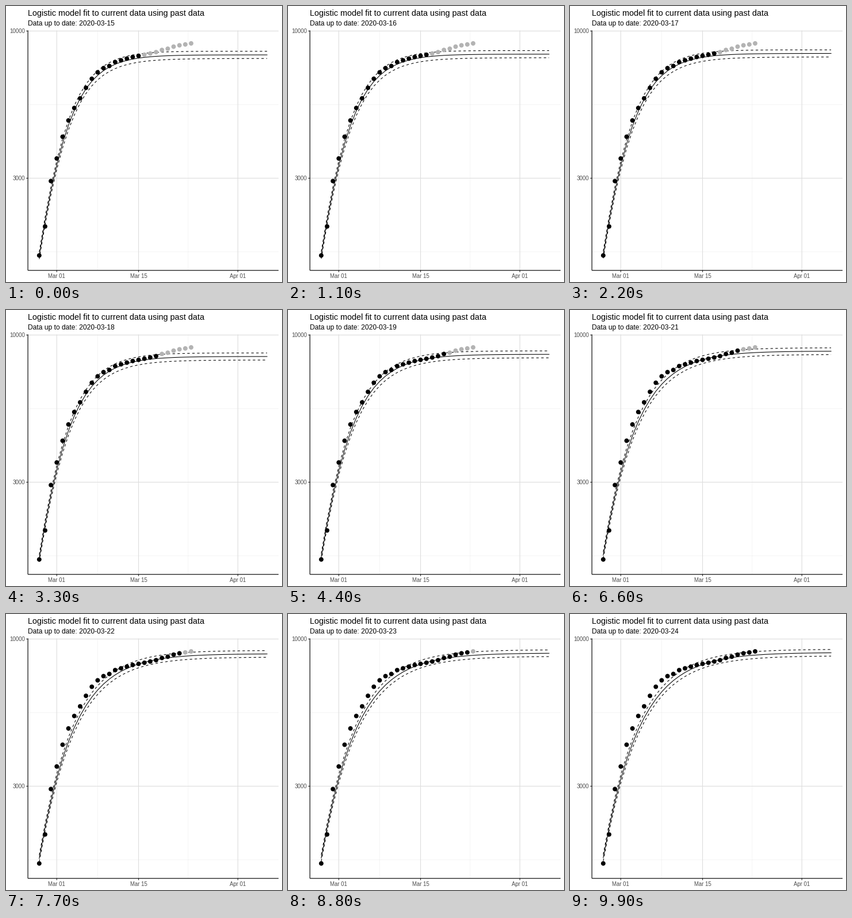
A matplotlib script for the animation above (10000 ms loop, 480 by 480 pixels).

```python
import matplotlib.pyplot as plt
import numpy as np
from matplotlib.animation import FuncAnimation

SIZE, DPI = 480, 72
LEFT, RIGHT, TOP, BOTTOM = 38.1, 474, 42.5, 459.8
DAY = 10.16           # pixels per day
DECADE = 489.6        # pixels per factor of ten
STEP_FRAMES = 11      # 1100 ms per date

plt.rcParams["font.family"] = "Liberation Sans"

cases = np.array([
    1595, 2022, 2931, 3526, 4212, 4812, 5328, 5766, 6284,
    6767, 7134, 7382, 7513, 7755, 7869, 7979, 8086, 8162,
    8236, 8320, 8413, 8565, 8652, 8799, 8897, 8961, 9037])
days = np.arange(40)
# How far the fit has drifted from the first date's to the last one's
drift = [0, .07, .14, .23, .44, .61, .75, .88, .95, 1]


def day_x(day):
    return 57.8 + DAY * np.asarray(day)


def count_y(n):
    return 43.5 + DECADE * (4 - np.log10(n))


def growth(d):
    """Generalised logistic curve in pixels, with the half width of its band."""
    plateau, start = 85 - 18 * d, 434 - 10 * d
    shape, rate = .5 - .4 * d, .268 - .096 * d
    q = 10 ** (shape * (start - plateau) / DECADE) - 1
    mid = plateau + DECADE / shape * np.log10(1 + q * np.exp(-rate * days))
    u = days / 6
    band = 6.2 - .5 * d + 2 * u * np.exp(1 - u)
    return mid, band


fig = plt.figure(figsize=(SIZE / DPI, SIZE / DPI), dpi=DPI, facecolor="white")
ax = fig.add_axes([0, 0, 1, 1])
ax.set(xlim=(0, SIZE), ylim=(SIZE, 0))
ax.axis("off")


def segment(x, y, color, lw, z=1):
    ax.plot(x, y, color=color, lw=lw, zorder=z, snap=False,
            solid_capstyle="butt")


def label(x, y, text, size, color="black", ha="left"):
    return ax.text(x, y, text, size=size, color=color, ha=ha, va="baseline")


# Grid
for x in (day_x(10), day_x(25.5)):
    segment([x, x], [TOP, BOTTOM], "#EBEBEB", .53)
for y in (171.5, 427.5):
    segment([LEFT, RIGHT], [y, y], "#EBEBEB", .53)
for day, name in ((3, "Mar 01"), (17, "Mar 15"), (34, "Apr 01")):
    x = day_x(day)
    segment([x, x], [TOP, BOTTOM], "#DEDEDE", 1.16)
    segment([x, x], [BOTTOM, BOTTOM + 3], "#333333", 1.16)
    label(x, 473, name, 9.6, "#4D4D4D", "center")
for n in (10000, 3000):
    y = count_y(n)
    segment([LEFT, RIGHT], [y, y], "#DEDEDE", 1.16)
    segment([LEFT - 3, LEFT], [y, y], "#333333", 1.16)
    label(32.7, y + 3.5, str(n), 9.6, "#4D4D4D", "right")

# Axes and title
segment([LEFT, LEFT], [TOP, BOTTOM], "black", 1.16, 5)
segment([LEFT, RIGHT], [BOTTOM, BOTTOM], "black", 1.16, 5)
label(38, 17, "Logistic model fit to current data using past data", 14.4)
subtitle = label(38, 34, "", 12)

# Fit and data
fit, = ax.plot([], [], "k-", lw=1.07, zorder=3)
limits = [ax.plot([], [], color="black", lw=1.07, zorder=3,
                  dashes=(4, 4), dash_capstyle="butt")[0] for _ in range(2)]
dots = ax.scatter(day_x(np.arange(len(cases))), count_y(cases), s=7.9 ** 2,
                  c=["black"] * len(cases), linewidths=0, zorder=4, snap=False)


def draw(frame):
    step = frame // STEP_FRAMES
    subtitle.set_text(f"Data up to date: 2020-03-{15 + step}")
    mid, band = growth(drift[step])
    fit.set_data(day_x(days), mid)
    for line, sign in zip(limits, (-1, 1)):
        line.set_data(day_x(days), mid + sign * band)
    known = 18 + step
    dots.set_facecolor(["black" if i < known else "#B3B3B3"
                        for i in range(len(cases))])
    return subtitle, fit, *limits, dots


anim = FuncAnimation(fig, draw, frames=100, interval=100,
                     init_func=lambda: draw(0), repeat=True, repeat_delay=0)
plt.show()
```
